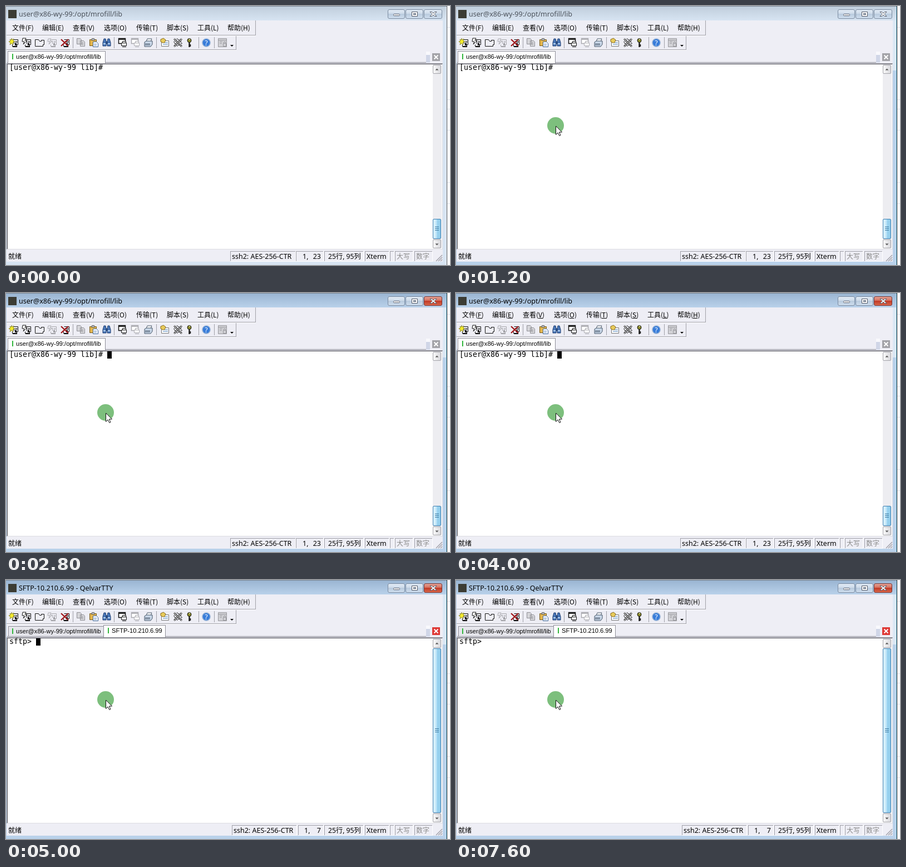
Recreate the animation shown at these times as an HTML page. Size 798x466 px, loop 8 s.

```html
<!DOCTYPE html>
<html lang="zh">
<head>
<meta charset="utf-8">
<title>Terminal</title>
<style>
html, body { margin: 0; width: 100%; height: 100%; overflow: hidden; background: #fff; }
svg { display: block; width: 798px; height: 466px; }
text { font: 12.5px "Noto Sans", "Noto Sans CJK SC", sans-serif; white-space: pre; }
.menu text { font: 12px "Noto Sans CJK SC", "Noto Sans CJK", sans-serif; }
.tab text { font: 11.1px "Liberation Sans", sans-serif; }
.term text { font: 13.3px "DejaVu Sans Mono", monospace; }
.crisp { shape-rendering: crispEdges; }
.dim { fill: #8a8a8a; }
.line { fill: none; stroke: #a0a0a8; }
.ink { fill: none; stroke: #111; }
</style>
</head>
<body>
<svg viewBox="0 0 798 466">
  <defs>
    <linearGradient id="idleTitle" x2="0" y2="1"><stop stop-color="#bfcddb"/><stop offset="1" stop-color="#d7e4f2"/></linearGradient>
    <linearGradient id="liveTitle" x2="0" y2="1"><stop stop-color="#99b4d1"/><stop offset="1" stop-color="#b9d1ea"/></linearGradient>
    <linearGradient id="button" x2="0" y2="1"><stop stop-color="#e3ecf6"/><stop offset=".5" stop-color="#cbd9e8"/><stop offset=".5" stop-color="#b9cbde"/><stop offset="1" stop-color="#d0dfef"/></linearGradient>
    <linearGradient id="redButton" x2="0" y2="1"><stop stop-color="#e6a598"/><stop offset=".5" stop-color="#d46a58"/><stop offset=".5" stop-color="#c23a26"/><stop offset="1" stop-color="#d8694d"/></linearGradient>
    <linearGradient id="thumb"><stop stop-color="#e0f4fd"/><stop offset=".5" stop-color="#bfe5f8"/><stop offset=".5" stop-color="#9dd5f2"/><stop offset="1" stop-color="#8cc8e8"/></linearGradient>
    <linearGradient id="arrowKey"><stop stop-color="#fafafa"/><stop offset="1" stop-color="#d8d8dc"/></linearGradient>
    <g id="plug">
      <path class="ink" d="M6.5 2.5h9v9h-2v3h-8v-3M8.5 5v5M11.5 5v5M13.5 5v3"/>
      <path d="M6 14h8v2H6zM10 9h3v4h-3z"/>
    </g>
    <g id="grip" stroke="#3b789f"><path d="M0 .5h7M0 3.5h7M0 6.5h7"/></g>
    <g id="printer">
      <path d="M4 5l2-5h8l-2 5z" fill="#fff" stroke="#456"/>
      <path d="M1 6l3-2h11v6l-3 4H1z" fill="#cbd9ea" stroke="#456"/>
      <path d="M2 9h9M2 11h9" stroke="#456"/>
    </g>
    <g id="windowPrinter">
      <path d="M.5.5h12v9H.5zM1 2h12" fill="#fff" stroke="currentColor" stroke-width="1.5"/>
      <path d="M5.5 8.5h9v5h-9zM7.5 8V5.5h6V8M7 15.5h7" fill="#fff" stroke="currentColor"/>
    </g>
  </defs>

  <!-- desktop edge and window frame -->
  <g class="crisp">
    <rect width="798" height="466" fill="#fbfcfe"/>
    <path d="M793 38.5h5M793 168.5h5M793 185.5h5M793 223.5h5M793 317.5h5M793 355.5h5" stroke="#dfe4ec"/>
    <rect id="frame" y="26" width="792" height="440"/>
    <rect id="frameTop" x="785" y="26" width="7" height="90" fill="#dce8f5"/>
    <rect id="titleBar" width="792" height="26"/>
    <path d="M0 .5h792" stroke="#7c8794"/>
    <path id="highlight" d="M791.5 1v465"/>
    <path id="outline" d="M792.5 0v466"/>
    <rect x="4" y="7" width="15" height="15" fill="#3c3c34"/>
  </g>
  <text id="title" x="23" y="19"></text>
  <g stroke="#7b8ba0">
    <rect x="686.5" y="6.5" width="30" height="16" rx="2.5" fill="url(#button)"/>
    <rect x="718.5" y="6.5" width="31" height="16" rx="2.5" fill="url(#button)"/>
    <rect id="closeButton" x="751.5" y="6.5" width="32" height="16" rx="2.5"/>
    <g stroke="#535a69" fill="#fff">
      <rect x="696.5" y="14.5" width="11" height="3" rx="1"/>
      <path fill-rule="evenodd" d="M729.5 10.5h10v8h-10zM732.5 13.5h4v2h-4z"/>
      <path d="M762 10.5h3.5l2.5 2.5 2.5-2.5h3.5l-4 4 4 4h-3.5l-2.5-2.5-2.5 2.5h-3.5l4-4z"/>
    </g>
  </g>

  <!-- menu and toolbar -->
  <g class="crisp">
    <rect x="1" y="26" width="784" height="434" fill="#eeeef5"/>
    <path class="line" d="M1 52.5h448M448.5 26v27M1 78.5h413M413.5 53v26"/>
    <path d="M1 53.5h448M1 79.5h413" stroke="#fff"/>
    <path class="line" d="M120.5 56v20M194.5 56v20M270.5 56v20M346.5 56v20M374.5 56v20"/>
  </g>
  <g id="menu" class="menu"></g>
  <g id="accessKeys" class="crisp"></g>

  <g>
    <g transform="translate(6 58)"><use href="#plug"/><path d="M4 0l1 3 3-2-1 4 3 1-4 2 1 4-3-3-3 3 1-4-3-2 3-1-1-3 3 1z" fill="#f4ec2c" stroke="#77720e" stroke-width=".7"/></g>
    <g transform="translate(29 58)"><use href="#plug"/><path d="M1 0h6L5 4h4L2 11l2-5H0z" fill="#fff" stroke="#111"/></g>
    <path transform="translate(52 58)" class="ink" d="M.5 13.5v-11h6l2 3h3v-2h5v8h-2v3h-14z"/>
    <g transform="translate(75 58)" opacity=".32"><use href="#plug"/><path class="ink" d="M1 1h5L4 5h4L2 11l2-5H0z"/></g>
    <g transform="translate(98 58)"><use href="#plug"/><path d="M1 2l13 12M14 2L1 14" stroke="#a01418" stroke-width="2.3"/></g>
    <g transform="translate(127 58)" fill="#d6d6da" stroke="#909096"><path d="M.5.5h6l2 2v8h-8zM6.5 4.5h6l2 2v8h-8zM8 8.5h4M8 11h4"/></g>
    <g transform="translate(150 58)"><path d="M.5 2.5h12v11H.5z" fill="#e4b64e" stroke="#775a1c"/><path d="M3.5 3.5l1-3h4l1 3z" fill="#ccc" stroke="#555"/><path d="M6.5 6.5h6l3 3v6h-9z" fill="#fff" stroke="#426a9c"/><path d="M8 10.5h5M8 13h5" stroke="#6b8fc0"/></g>
    <g transform="translate(173 58)" fill="#4876b8" stroke="#203f70"><path d="M3 1h3l1 5v8H1V8zM10 1h3l2 7v6H9V6zM7 6h2v4H7z"/><path d="M2 10h4M10 10h4" stroke="#bcd8f6" stroke-width="2"/></g>
    <use href="#windowPrinter" x="202" y="58" color="#111"/>
    <use href="#windowPrinter" x="225" y="58" color="#aaaab0"/>
    <use href="#printer" x="248" y="59"/>
    <g transform="translate(277 58)"><path d="M2.5 4.5h13v10h-13z" fill="#fff" stroke="#777"/><path d="M8 8h6M5 11h9" stroke="#4b80bb"/><path d="M1 2l5-2 4 3-2 5H4L1 6z" fill="#e8cb5a" stroke="#886b20"/></g>
    <g transform="translate(301 58)" fill="none"><path d="M1 1l14 14M15 1L1 15" stroke="#111" stroke-width="3"/><path d="M1 1l14 14M15 1L1 15" stroke="#fff" stroke-width="1.5" stroke-dasharray="2 1"/><path d="M6 1l4 2M1 6l2 4M13 6l2 4M6 14l4-2" stroke="#111" stroke-width="1.7" stroke-dasharray="1.5"/></g>
    <g transform="translate(324 58)"><circle cx="5.5" cy="4" r="3.5" fill="#8d8c28" stroke="#111"/><path d="M5.5 7v9M7 11v4" stroke="#222" stroke-width="2.5"/><path d="M5 2h2" stroke="#fff"/></g>
    <circle cx="360" cy="66" r="7" fill="#377cda" stroke="#8faed4" stroke-width="1.5"/>
    <text x="360" y="70.5" text-anchor="middle" fill="#fff" font-weight="700">?</text>
    <g transform="translate(381 58)" fill="#d2d2d6" stroke="#98989d"><path d="M.5.5h15v15H.5zM1 3.5h14M3 6h5M3 9h4M9.5 9.5h5v5h-5zM10.5 9V6.5h3V9"/></g>
    <path d="M403 70h6l-3 3z"/>
  </g>

  <!-- tabs -->
  <g class="crisp">
    <path d="M2 101.5h753" stroke="#85858f"/>
    <rect x="755" y="82" width="7" height="6" fill="#f8f8fc"/>
    <rect x="755" y="88" width="7" height="14" fill="#d0d6e7"/>
    <rect id="tabClose" x="766" y="85" width="14" height="14"/>
  </g>
  <path d="M769.5 88.5l7 7M776.5 88.5l-7 7" stroke="#fff" stroke-width="2"/>
  <g class="tab">
    <path id="shellTab" stroke="#8e8e98" class="crisp"/>
    <g id="shellLabel">
      <rect x="11" y="86" width="2" height="10" fill="#32b63c"/>
      <text x="18" y="95">user@x86-wy-99:/opt/mrofill/lib</text>
    </g>
    <g id="sftpTab">
      <path class="crisp" d="M175.5 103V81.5h111V103" fill="#fff" stroke="#8e8e98"/>
      <rect x="183" y="86" width="2" height="10" fill="#32b63c"/>
      <text x="190" y="95">SFTP-10.210.6.99</text>
    </g>
  </g>

  <!-- terminal and scroll bar -->
  <g class="crisp">
    <rect x="2" y="103" width="783" height="335" fill="#fff"/>
    <path d="M1.5 438V103.5H785" class="line"/>
    <path d="M2.5 437V104.5H784" fill="none" stroke="#606068"/>
    <path d="M2 437.5h783M784.5 104v334" stroke="#dcdce2"/>
    <rect x="767" y="105" width="16" height="331" fill="#ededf1"/>
  </g>
  <g class="term">
    <text id="prompt" x="6" y="115"></text>
    <rect id="caret" class="crisp" y="105" width="8" height="13"/>
  </g>
  <g fill="url(#arrowKey)" stroke="#a4a4aa">
    <rect x="767.5" y="106.5" width="14" height="15" rx="1.5"/>
    <rect x="767.5" y="420.5" width="14" height="15" rx="1.5"/>
  </g>
  <path d="M771.5 115.5l3-3 3 3zM771.5 427.5l3 3 3-3z" fill="#555"/>
  <rect id="thumbBox" x="767.5" width="14" rx="1.5" fill="url(#thumb)" stroke="#3c7fb1"/>
  <use id="thumbGrip" href="#grip" x="771"/>

  <!-- status bar -->
  <text x="4" y="455" style="font-size:12px">就绪</text>
  <g id="panes" class="crisp"></g>
  <text id="cipher" y="455">ssh2: AES-256-CTR</text>
  <text id="row" y="455">1,</text>
  <text id="column" y="455" text-anchor="end" x="566"></text>
  <text x="579" y="455" style="font-size:12.2px">25行, 95列</text>
  <text x="648" y="455">Xterm</text>
  <text x="702" y="455" class="dim" style="font-size:12px">大写</text>
  <text x="737" y="455" class="dim" style="font-size:12px">数字</text>
  <path d="M773 459l11-11M777 459l7-7M781 459l3-3" stroke="#a4a4ac" stroke-width="1.5"/>

  <g id="pointer">
    <circle r="15" fill="#7dbf7d"/>
    <circle id="clickRing" r="14.5" fill="none" stroke="#f00" stroke-width="3"/>
    <path d="M.5 1v15.5l3.5-3.5 2.8 5.500 2.200-1-2.500-5.500h5z" fill="#fff" stroke="#111"/>
  </g>
</svg>
<script>
const $ = id => document.getElementById(id);
const set = (id, attrs) => Object.entries(attrs).forEach(([k, v]) => $(id).setAttribute(k, v));
const show = (id, on) => $(id).style.display = on ? '' : 'none';
const within = (t, spans) => spans.some(([from, to]) => t >= from && t < to);

const LOOP = 8000;
const FRAME = 1200, ACTIVATE = 1400, SFTP = 4400;
const moves = [[600, 166, 316], [800, 173, 274], [1000, 179, 218], [1200, 179, 215]];
const caretOn = [[1400, 2400], [2800, 3400], [4000, 4400], [5000, 5600], [6000, 6600], [7200, 7600]];
const menu = [[11, '文件(F)'], [65, '编辑(E)'], [120, '查看(V)'], [176, '选项(O)'],
  [234, '传输(T)'], [289, '脚本(S)'], [344, '工具(L)'], [398, '帮助(H)']];

$('menu').innerHTML = menu.map(([x, label]) => `<text x="${x}" y="44">${label}</text>`).join('');
$('accessKeys').innerHTML = menu.map(([x]) => `<rect x="${x + 28}" y="45" width="8" height="1"/>`).join('');

const pane = (left, right) =>
  `<path class="line" d="M${left + .5} 459V441.5H${right}"/>` +
  `<path d="M${left} 459.5H${right + .5}V441" fill="none" stroke="#fff"/>`;

function drawSession(sftp) {
  $('title').textContent = sftp ? 'SFTP-10.210.6.99 - QelvarTTY' : 'user@x86-wy-99:/opt/mrofill/lib';
  $('prompt').textContent = sftp ? 'sftp>' : '[user@x86-wy-99 lib]#';
  $('column').textContent = sftp ? '7' : '23';
  $('panes').innerHTML = [sftp ? [406, 522] : [403, 520], sftp ? [525, 570] : [521, 570],
    [572, 642], [645, 688], [690, 697], [699, 731], [734, 766]].map(p => pane(...p)).join('');
  set('cipher', { x: sftp ? 409 : 406 });
  set('row', { x: sftp ? 536 : 533 });
  set('caret', { x: sftp ? 54 : 182 });
  set('shellTab', sftp
    ? { d: 'M4.5 101.5V83.5H175.5V101.5z', fill: '#e6e6ec' }
    : { d: 'M3.5 103V81.5H178.5V103', fill: '#fff' });
  set('shellLabel', { transform: `translate(0 ${sftp ? 1 : 0})` });
  set('tabClose', { fill: sftp ? '#df3a36' : '#a3a3a8' });
  set('thumbBox', sftp ? { y: 123.5, height: 295 } : { y: 383.5, height: 35 });
  set('thumbGrip', { y: sftp ? 267 : 397 });
  show('sftpTab', sftp);
}

let session;
function draw(t) {
  const sftp = t >= SFTP, active = t >= ACTIVATE, framed = t >= FRAME;
  if (sftp !== session) drawSession(session = sftp);

  set('titleBar', { fill: `url(#${active ? 'liveTitle' : 'idleTitle'})` });
  set('title', { fill: active ? '#000' : '#4c535c' });
  set('closeButton', { fill: `url(#${active ? 'redButton' : 'button'})`, stroke: active ? '#7c3430' : '#7b8ba0' });
  set('frame', { fill: framed ? '#b9d1ea' : '#d7e4f2' });
  set('highlight', { stroke: framed ? '#8fd8f5' : '#f2f6fb' });
  set('outline', { stroke: framed ? '#16181c' : '#4a4f57' });
  show('frameTop', framed);
  show('accessKeys', within(t, [[3400, SFTP]]));
  show('caret', within(t, caretOn));

  const spot = moves.filter(m => t >= m[0]).pop();
  show('pointer', spot);
  if (spot) set('pointer', { transform: `translate(${spot[1]} ${spot[2]})` });
  show('clickRing', within(t, [[1400, 1600]]));
}

const start = performance.now();
function tick() {
  draw((performance.now() - start) % LOOP);
  requestAnimationFrame(tick);
}
tick();
</script>
</body>
</html>
```
